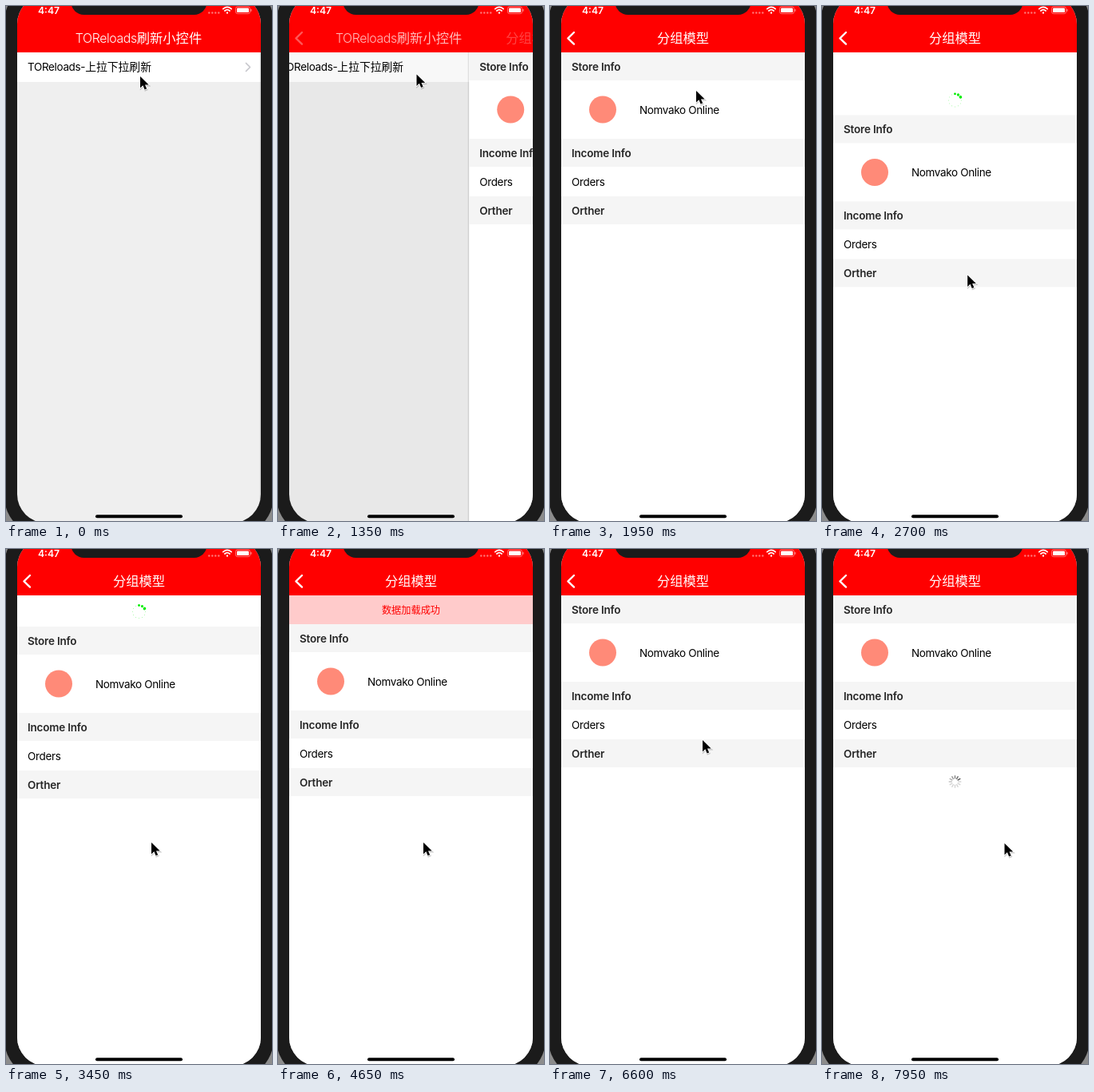
Recreate the animation shown at these times as an HTML page. Size 333x644 px, loop 8000 ms.

```html
<!DOCTYPE html>
<html lang="zh">
<head>
<meta charset="utf-8">
<title>Pull to refresh</title>
<style>
  html, body { margin: 0; width: 100%; height: 100%; overflow: hidden; background: #8c8c8c; }
  svg { display: block; width: 333px; height: 644px; }
  text { font: 13.5px Inter, "Noto Sans CJK SC", "Noto Sans CJK", sans-serif; letter-spacing: -.35px; }
  .han { font-size: 13.8px; letter-spacing: 0; }
  .head { font-weight: 600; letter-spacing: -.2px; fill: #262626; }
  .title { font-size: 15.8px; font-weight: 300; fill: #fff; text-anchor: middle; }
  .title .han { font-size: 16.3px; }
  .line { fill: none; stroke-linecap: round; stroke-linejoin: round; }
</style>
</head>
<body>
<svg viewBox="0 0 333 644">
  <clipPath id="screen"><rect x="14" y="-13.5" width="305" height="660" rx="36"/></clipPath>
  <rect x="-2" y="-30" width="337" height="693" rx="50" fill="#1b1b1b"/>
  <g clip-path="url(#screen)">
    <rect width="333" height="644" fill="#efefef"/>
    <g id="list">
      <rect x="14" y="58" width="305" height="37" fill="#fff"/>
      <text x="27" y="81">TOReloads-<tspan class="han">上拉下拉刷新</tspan></text>
      <path class="line" d="M300.5 71.5l5 5-5 5" stroke="#c7c7cc" stroke-width="1.7"/>
    </g>
    <rect id="dim" width="333" height="644"/>

    <g id="detail">
      <rect x="12.5" y="58" width="1.5" height="586" opacity=".1"/>
      <rect x="14" y="58" width="305" height="586" fill="#fff"/>
      <g id="dots" fill="#00ee00"></g>
      <g id="rows">
        <circle cx="66" cy="129.5" r="17" fill="#ff8a78"/>
        <text x="112" y="135">Nomvako Online</text>
        <rect x="14" y="166" width="305" height="35" fill="#f5f5f5"/>
        <text class="head" x="27" y="189">Income Info</text>
        <text x="27" y="224.5">Orders</text>
        <rect x="14" y="238" width="305" height="35" fill="#f5f5f5"/>
        <text class="head" x="27" y="261">Orther</text>
        <g id="spokes" stroke="#555" stroke-width="1.4" stroke-linecap="round"></g>
      </g>
      <g id="sticky">
        <rect x="14" y="58" width="305" height="35" fill="#f5f5f5"/>
        <text class="head" x="27" y="81">Store Info</text>
      </g>
      <g id="banner">
        <rect x="14" y="58" width="305" height="36" fill="#ffcbcb"/>
        <text x="166.5" y="80.5" text-anchor="middle" fill="#f00"><tspan class="han" style="font-size:12.2px">数据加载成功</tspan></text>
      </g>
    </g>

    <rect width="333" height="58" fill="#f00"/>
    <text id="oldTitle" class="title" x="166" y="46">TOReloads<tspan class="han">刷新小控件</tspan></text>
    <text id="newTitle" class="title" x="166.5" y="46"><tspan class="han">分组模型</tspan></text>
    <path id="back" class="line" d="M30 33l-7.5 7.3 7.5 7.3" stroke="#fff" stroke-width="2.4"/>

    <text x="40" y="10" fill="#fff" style="font-size:12.2px;font-weight:600;letter-spacing:0">4:47</text>
    <g fill="#ff7373">
      <circle cx="254.3" cy="8.5" r="1.2"/><circle cx="258.3" cy="8.5" r="1.2"/>
      <circle cx="262.3" cy="8.5" r="1.2"/><circle cx="266.3" cy="8.5" r="1.2"/>
    </g>
    <g class="line" stroke="#fff" stroke-width="1.7">
      <path d="M271.8 3.6q5.2-4.4 10.4 0M273.9 6q3.1-2.6 6.2 0"/>
      <path d="M277 8.4v.3" stroke-width="2.2"/>
    </g>
    <rect x="287.5" y="1" width="18" height="8.6" rx="2.4" fill="none" stroke="#ff8c8c" stroke-width=".8"/>
    <rect x="289" y="2.5" width="15" height="5.6" rx="1.2" fill="#fff"/>
    <rect x="306.4" y="3.8" width="1.2" height="3" rx=".6" fill="#ff8c8c"/>
    <rect x="81.5" y="-40" width="170" height="51" rx="16" fill="#1b1b1b"/>
    <rect x="112" y="636.3" width="109" height="4" rx="2"/>
  </g>
  <g id="cursor">
    <path d="M0 0V14.5L3.4 11.3 5.6 16.5 8.2 15.4 6 10.4H10.7Z" transform="translate(.6 1.2)" opacity=".22" stroke="#000" stroke-width="1.6"/>
    <path d="M0 0V14.5L3.4 11.3 5.6 16.5 8.2 15.4 6 10.4H10.7Z" stroke="#fff" stroke-width="1.8" stroke-linejoin="round" paint-order="stroke"/>
  </g>
</svg>
<script>
const LOOP = 8000, TICK = 150;
const $ = id => document.getElementById(id);
const move = (id, x, y) => $(id).setAttribute('transform', `translate(${x} ${y})`);
const fade = (id, a) => $(id).setAttribute('opacity', a);
const ramp = (t, a, b) => Math.min(1, Math.max(0, (t - a) / (b - a)));
const smooth = u => u * u * (3 - 2 * u);
const easeOut = u => 1 - (1 - u) ** 3;

// Pointer stops: time, x, y
const stops = [
  [150, 168, 88], [600, 173.5, 85.5], [1500, 173.5, 85.5], [1950, 183, 106],
  [2250, 183, 172], [2850, 182, 367], [5850, 182, 367], [6600, 191, 239],
  [6900, 176, 141], [7200, 175, 135], [7350, 175, 135], [7950, 228.5, 368]
];

function pointer(t) {
  const i = stops.findIndex(s => s[0] >= t);
  if (i < 1) return i ? stops.at(-1).slice(1) : stops[0].slice(1);
  const [t0, x0, y0] = stops[i - 1], [t1, x1, y1] = stops[i];
  const u = smooth(ramp(t, t0, t1));
  return [x0 + (x1 - x0) * u, y0 + (y1 - y0) * u];
}

// Resistance of a list dragged past its end
const rubber = d => d * .55 / (Math.abs(d) * .55 / 588 + 1);

function scrollOffset(t, y) {
  if (t < 2250) return 0;
  if (t < 3450) return rubber(y - 172);
  if (t < 4350) return 39;
  if (t < 6600) return 36 * (1 - easeOut(ramp(t, 5850, 6150)));
  if (t < 7500) return rubber(y - 239);
  return -52 * (1 - easeOut(ramp(t, 7350, 7750)));
}

function addPart(parent, tag, attrs) {
  const el = document.createElementNS('http://www.w3.org/2000/svg', tag);
  for (const k in attrs) el.setAttribute(k, attrs[k]);
  $(parent).append(el);
}
for (let i = 0; i < 12; i++) {
  const transform = `rotate(${-30 * i})`;
  addPart('dots', 'circle', { cy: -8, r: Math.max(.5, 1.8 - i * .2 - (i > 2)), opacity: i < 3 ? 1 : .4, transform });
  addPart('spokes', 'line', { y1: -4.2, y2: -7.3, opacity: Math.max(.25, 1 - i * .13), transform });
}

function spin(id, y, t) {
  const angle = 60 + Math.round(t * 12 / 1000) * 30;
  $(id).setAttribute('transform', `translate(166.5 ${y}) rotate(${angle})`);
}

function draw(t) {
  const [x, y] = pointer(t);
  const off = scrollOffset(t, y);
  const p = easeOut(ramp(t, 1300, 1820));
  move('cursor', x, y);

  move('list', -95 * p, 0);
  fade('dim', .1 * p);
  move('detail', 305 * (1 - p), 0);
  move('oldTitle', -57 * p, 0);
  fade('oldTitle', 1 - p);
  move('newTitle', 205 * (1 - p), 0);
  fade('newTitle', p);
  fade('back', Math.min(1, p * 1.3));

  move('rows', 0, off);
  move('sticky', 0, Math.max(0, off));
  spin('dots', 39.5 + off, Math.max(0, t - 3450));
  fade('dots', t < 4350 ? ramp(off, 0, 39) : 0);
  spin('spokes', 291, Math.max(7500, t) - 7950);
  fade('spokes', t > 6600 ? 1 : 0);
  fade('banner', ramp(t, 4350, 4650) * (1 - ramp(t, 5850, 6150)));
}

const start = performance.now();
function frame() {
  const t = (performance.now() - start) % LOOP;
  draw(Math.floor(t / TICK) * TICK);
  requestAnimationFrame(frame);
}
frame();
</script>
</body>
</html>
```
